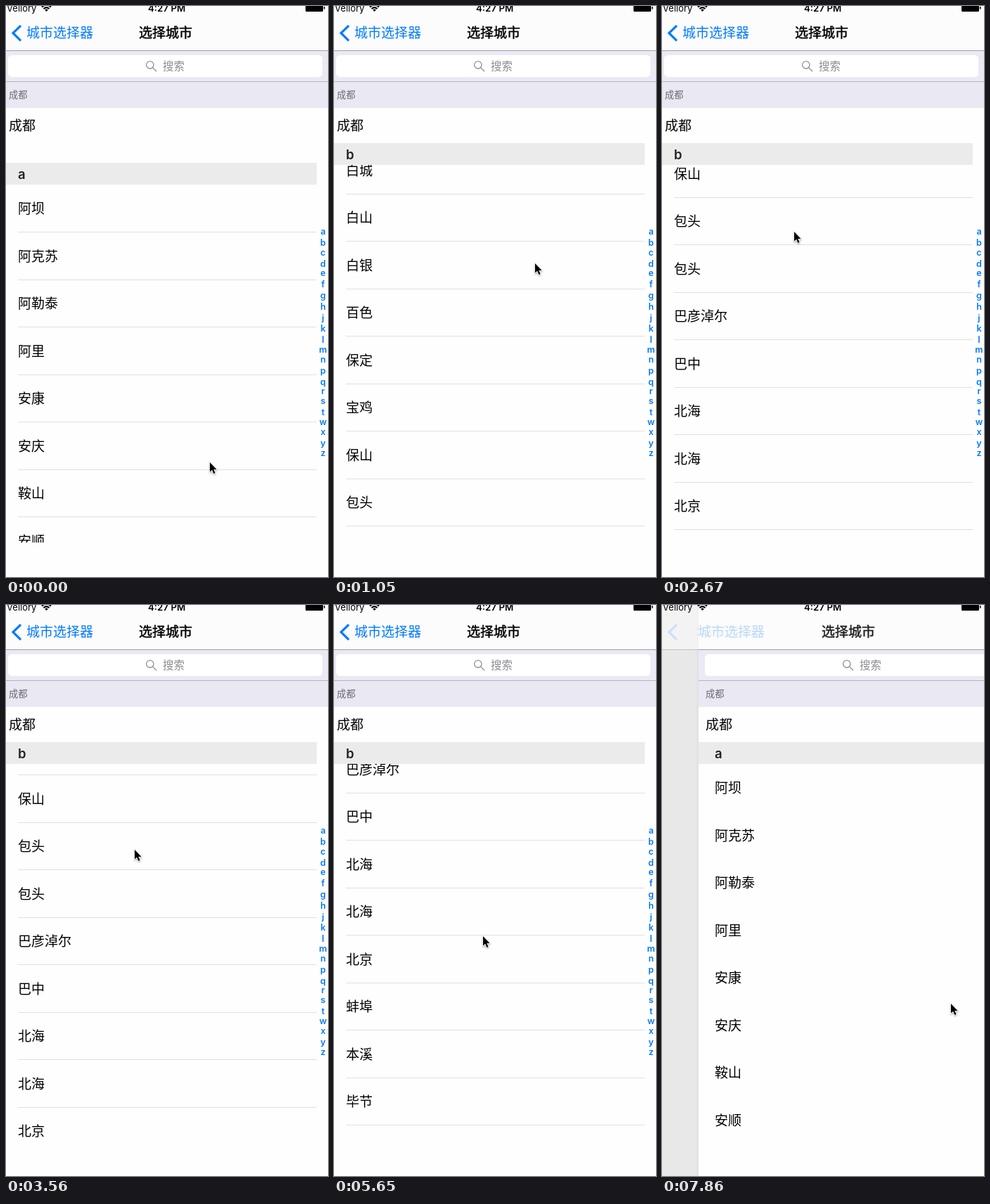
Animation of 458 by 812 pixels, one loop 8000 ms. Source, as an HTML page:

```html
<!DOCTYPE html>
<html lang="zh-CN">
<head>
<meta charset="utf-8">
<title>选择城市</title>
<style>
html, body { margin: 0; width: 100%; height: 100%; overflow: hidden; background: #fefefe; }
body { font: 19px "Noto Sans CJK SC", "Noto Sans CJK", sans-serif; color: #000; }
#stage { position: relative; width: 458px; height: 812px; overflow: hidden; }
#stage div, #stage svg, .t { position: absolute; }
.t { line-height: 0; white-space: nowrap; }
.latin { font-family: Inter, sans-serif; }
.bold { font-weight: 600; }
.medium { -webkit-text-stroke: .45px #000; }
.blue { color: #007aff; }
#home, #dim { left: 0; top: 0; width: 458px; height: 812px; }
#home { background: #fefefe; }
#dim { background: #000; }
.rule { left: 0; width: 100%; height: 1px; }
/* the phone screen starts 6px left of the stage */
#list { left: -6px; top: 0; width: 466px; height: 812px; background: #fefefe; box-shadow: 0 0 6px rgba(0,0,0,.07); }
#search { top: 64px; width: 100%; height: 43px; background: #ebe9f3; }
#field { left: 9px; top: 6px; width: 447px; height: 31px; border-radius: 5px; background: #fff; }
#current { top: 108px; width: 100%; height: 37px; background: #eae8f2; }
#table { left: 0; top: 195px; width: 448px; height: 568px; overflow: hidden; }
.row { left: 23px; top: 0; width: 425px; height: 67px; }
.row .t { left: 0; top: 33px; }
.lined::before { content: ""; position: absolute; left: 0; top: 0; width: 100%; height: 1px; background: #e0e0e2; }
.head { left: 0; top: 0; width: 100%; height: 31px; background: #ebebeb; }
.head .t { left: 23px; top: 16px; font-size: 18.5px; color: #222; }
.key { left: 447px; width: 20px; text-align: center; font-size: 12.5px; }
#nav { left: 0; top: 0; width: 458px; height: 63px; background: rgba(252,252,252,.6); }
</style>
</head>
<body>
<div id="stage">
  <div id="home">
    <div class="rule" style="top:63px;background:#d2d2d2"></div>
    <span class="t blue" style="left:191px;top:404px;font-size:17px">爷,选一个</span>
    <span class="t" style="left:189px;top:450px">巴彦淖尔</span>
  </div>
  <div id="dim"></div>
  <div id="list">
    <div class="rule" style="top:63px;background:#a0a0a4"></div>
    <div id="search">
      <div id="field"></div>
      <svg style="left:204px;top:13px" width="18" height="18" fill="none" stroke="#8e8e93" stroke-width="1.3">
        <circle cx="6.8" cy="6.8" r="5.2"/><path d="M10.6 10.6L16 16"/>
      </svg>
      <span class="t" style="left:229px;top:20px;font-size:15.5px;color:#8e8e93">搜索</span>
    </div>
    <div class="rule" style="top:107px;background:#b4b3ba"></div>
    <div id="current"><span class="t" style="left:10px;top:18px;font-size:13.3px;color:#6d6d72">成都</span></div>
    <span class="t" style="left:10px;top:169px">成都</span>
    <div id="table"></div>
  </div>
  <div id="nav">
    <span class="t latin" style="left:1px;top:3px;font-size:13px">Vellory</span>
    <svg style="left:50px;top:-3px" width="15" height="12" fill="none" stroke="#000" stroke-width="2">
      <path d="M1 4.5Q7.5 -1.5 14 4.5M3.5 7Q7.5 3.3 11.5 7"/><path d="M5.2 8.6Q7.5 6.6 9.8 8.6L7.5 11Z" fill="#000" stroke="none"/>
    </svg>
    <span class="t latin bold" style="left:202px;top:3px;font-size:13.3px">4:27 PM</span>
    <svg style="left:426px;top:0" width="28" height="9"><path d="M0 0H25V6.5Q25 8 23.5 8H1.5Q0 8 0 6.5ZM26 1H27.5V4.5H26Z"/></svg>
    <svg id="arrow" style="left:7px;top:26px" width="16" height="26" fill="none" stroke="#007aff" stroke-width="3.2"><path d="M14 1.8L3 12.5L14 23.4"/></svg>
    <span id="back" class="t blue" style="left:29px;top:37px">城市选择器</span>
    <span id="homeTitle" class="t medium" style="left:180px;top:37px">城市选择器</span>
    <span id="listTitle" class="t medium" style="left:189px;top:37px">选择城市</span>
  </div>
  <svg id="cursor" style="left:-2px;top:-2px" width="18" height="24">
    <path d="M2 2V15.6L5.1 12.8L7.4 18L9.6 17L7.3 12H11.6Z" stroke="#fff" stroke-width="1.6" paint-order="stroke" style="filter:drop-shadow(0 1px 1px rgba(0,0,0,.4))"/>
  </svg>
</div>
<script>
const LOOP = 8000, STEP = 148.3, LAST = 53;
const ROW = 67.5, HEAD = 31;
const sections = [
  ['a', '阿坝 阿克苏 阿勒泰 阿里 安康 安庆 鞍山 安顺 安阳 澳门'],
  ['b', '白城 白山 白银 百色 保定 宝鸡 保山 包头 包头 巴彦淖尔 巴中 北海 北海 北京 蚌埠 本溪 毕节 亳州']
];
const keys = 'abcdefghjklmnpqrstwxyz';

const easeIn = u => u * u;
const easeOut = u => 1 - (1 - u) ** 3;
const smooth = u => u * u * (3 - 2 * u);
const during = (n, from, to) => Math.min(1, Math.max(0, (n - from) / (to - from)));

// Pull, flick, small drag back, second flick; the list reopens at its top
function scrollAt(n) {
  if (n > 45) return 0;
  return -28
    + 120.75 * easeIn(during(n, 0, 4))
    + 1039.3 * easeOut(during(n, 4, 15))
    - 36.55 * smooth(during(n, 19, 24))
    + 244.25 * smooth(during(n, 31, 36));
}

// 0 with the list open, 1 with the home page open
const slideAt = n => easeOut(during(n, 41, 45)) - easeOut(during(n, 50, 56));

// Mouse strokes: first step, last step, dx, dy
const strokes = [
  [0, 4, -3, -309], [5, 12, -7, 131], [12, 19, -97, -159], [19, 24, 0, 36], [30, 32, 22, 212],
  [32, 36, 7, -89], [38, 40, 18, -226], [41, 45, 115, 375], [46, 49, -113, -218], [50, 53, 179, 165]
];
function mouseAt(n) {
  let x = 290, y = 649;
  for (const [from, to, dx, dy] of strokes) {
    const u = smooth(during(n, from, to));
    x += dx * u;
    y += dy * u;
  }
  return [Math.round(x), Math.round(y)];
}

const $ = id => document.getElementById(id);

function add(parent, cls, html) {
  const el = document.createElement('div');
  el.className = cls;
  el.innerHTML = html;
  parent.append(el);
  return el;
}

function move(el, x, y = 0) {
  el.style.transform = `translate(${x}px, ${y}px)`;
}

const rows = [], heads = [];
let top0 = 0;
for (const [letter, names] of sections) {
  heads.push({ letter, y: top0 });
  top0 += HEAD;
  names.split(' ').forEach((name, i) => {
    const el = add($('table'), 'row', `<span class="t">${name}</span>`);
    rows.push({ y: top0, el, label: el.firstChild, first: i === 0 });
    top0 += ROW;
  });
}
for (const h of heads) h.el = add($('table'), 'head', `<span class="t latin bold">${h.letter}</span>`);

// tall letters and descenders take more room in the index
let keyY = 307.1;
for (const k of keys) {
  keyY += /[bdfghjklpqty]/.test(k) ? 15.8 : 13.9;
  add($('list'), 't key latin bold blue', k).style.top = Math.round(keyY) + 'px';
}

function drawTable(s) {
  for (const r of rows) {
    const y = r.y - s, line = Math.floor(y);
    const phase = (y - HEAD) / ROW;
    // hairlines vanish when the rows line up with the header
    const aligned = Math.abs(phase - Math.round(phase)) * ROW < 1;
    move(r.el, 0, line);
    move(r.label, 0, Math.round(y) - line);
    r.el.classList.toggle('lined', !r.first && !aligned);
  }
  heads.forEach((h, i) => {
    const next = heads[i + 1];
    const pinned = Math.max(0, h.y - s);
    move(h.el, 0, Math.floor(next ? Math.min(pinned, next.y - s - HEAD) : pinned));
  });
}

function drawSlide(e) {
  move($('list'), Math.round(466 * e));
  $('list').style.visibility = e < 1 ? 'visible' : 'hidden';
  move($('home'), Math.round(-140 * (1 - e)));
  $('dim').style.opacity = .1 * (1 - e);
  $('arrow').style.opacity = Math.max(0, 1 - 6.8 * e);
  $('back').style.opacity = Math.max(0, 1 - 6 * e);
  move($('back'), Math.round(177 * e));
  move($('homeTitle'), Math.round(-151 * (1 - e)));
  $('homeTitle').style.opacity = e * e;
  move($('listTitle'), Math.round(306 * e));
  $('listTitle').style.opacity = 1 - e;
}

function frame(now) {
  const n = Math.min(LAST, Math.floor(now % LOOP / STEP));
  drawTable(scrollAt(n));
  drawSlide(slideAt(n));
  move($('cursor'), ...mouseAt(n));
  requestAnimationFrame(frame);
}
frame(performance.now());
</script>
</body>
</html>
```
